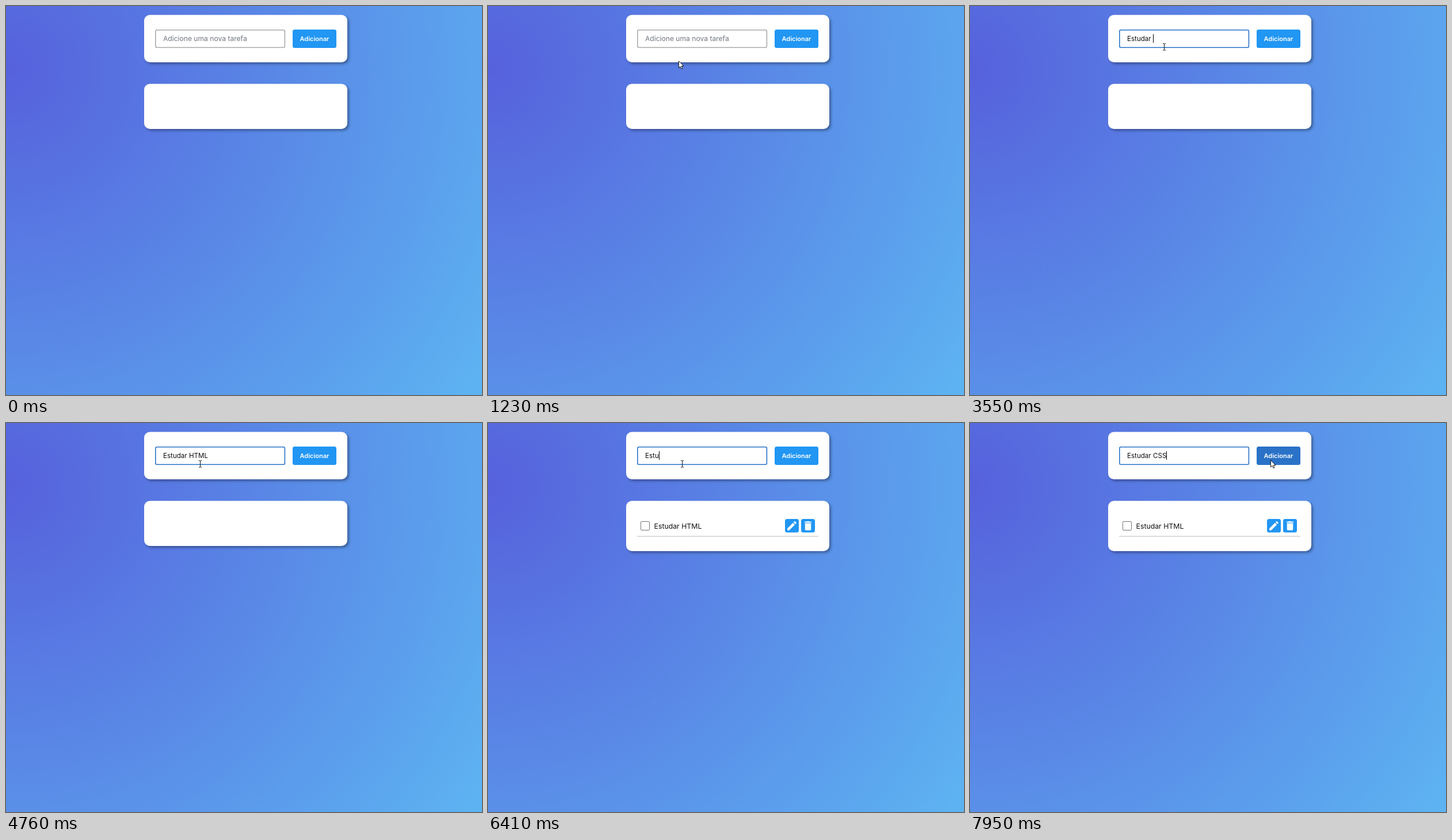
Recreate the animation shown at these times as an HTML page. Size 827 by 677 pixels, loop 8 s.

```html
<!DOCTYPE html>
<html lang="pt">
<head>
<meta charset="utf-8">
<title>Lista de tarefas</title>
<style>
  html, body { margin: 0; width: 100%; height: 100%; overflow: hidden; }
  body { background: radial-gradient(circle farthest-corner at 0 16%, #5661dc, #5db4f2); }
  svg { display: block; width: 827px; height: 677px; }
  text { font-family: Inter, "Open Sans", sans-serif; white-space: pre; }
  .card { fill: #fff; filter: drop-shadow(3px 3px 2px rgba(0, 0, 0, .33)); }
  .blue { fill: #2196f3; }
  .icon { fill: #fff; }
</style>
</head>
<body>
<svg viewBox="0 0 827 677">
  <rect class="card" x="240" y="15.5" width="353" height="82.5" rx="10"/>
  <rect id="field" x="259.8" y="41.8" width="224.6" height="30.4" rx="2.5" fill="#fff" stroke-width="1.6"/>
  <text id="hint" x="273" y="60.5" font-size="12.1" fill="#707580">Adicione uma nova tarefa</text>
  <text id="typed" x="273" y="60.5" font-size="11.6" fill="#111"></text>
  <rect id="caret" y="49" width="1" height="15"/>
  <rect id="button" x="498" y="41" width="76" height="32" rx="3.5"/>
  <text x="536" y="60.5" font-size="11" font-weight="600" fill="#fff" text-anchor="middle">Adicionar</text>

  <rect id="list" class="card" x="240" y="135.5" width="353" rx="10"/>
  <g id="task">
    <rect x="265.5" y="171.5" width="15" height="15" rx="1.5" fill="#fff" stroke="#767676"/>
    <text x="288.5" y="183.5" font-size="12.3" fill="#111">Estudar HTML</text>
    <rect x="259" y="196.5" width="315" height="1.5" fill="#d0d0d0"/>
    <rect class="blue" x="516" y="167" width="24" height="23.5" rx="3.5"/>
    <rect class="blue" x="544" y="167" width="24" height="23.5" rx="3.5"/>
    <path class="icon" transform="translate(517.5 168.3) scale(.875)" d="M3 17.25V21h3.75L17.81 9.94l-3.75-3.75zM20.71 7.04a1 1 0 0 0 0-1.41l-2.34-2.34a1 1 0 0 0-1.41 0l-1.83 1.83 3.75 3.75z"/>
    <path class="icon" transform="translate(545.5 168.3) scale(.875)" d="M6 19c0 1.1.9 2 2 2h8c1.1 0 2-.9 2-2V7H6zM19 4h-3.5l-1-1h-5l-1 1H5v2h14z"/>
  </g>

  <path id="arrow" d="M.4 .8V12.9L3.2 10.3 5 14.5 7 13.7 5.2 9.5H9Z" fill="#fff" stroke="#000" stroke-width=".9"/>
  <path id="beam" d="M-2.5 -5.5H-.7L0 -5 .7 -5.5H2.5M0 -5V5.5M-2.5 6H-.7L0 5.5 .7 6H2.5" fill="none" stroke="#111"/>
</svg>
<script>
const LOOP = 8000, STEP = 70, FOCUS = 1970, SUBMIT = 5140;
const $ = id => document.getElementById(id);
const show = (id, on) => $(id).style.display = on ? '' : 'none';
const between = (t, a, b) => t >= a && t < b;

// Each entry of times is the moment the matching character appears.
const entries = [
  { text: 'Estudar HTML', end: SUBMIT,
    times: [2570, 2830, 2960, 3160, 3260, 3360, 3450, 3550, 3750, 3880, 4080, 4280] },
  { text: 'Estudar CSS', end: LOOP,
    times: [5750, 6130, 6280, 6410, 6540, 6620, 6700, 6790, 7140, 7270, 7400] }
];

function typedAt(t) {
  const entry = entries.find(e => t < e.end);
  return entry.text.slice(0, entry.times.filter(time => time <= t).length);
}

// The pointer advances in discrete steps and slows down towards its goal.
const progress = (t, start, count) =>
  Math.min(1, Math.floor((t - start) / STEP + 1) / count);
const ease = (from, to, p, power = 2) => to + (from - to) * (1 - p) ** power;

function pointerAt(t) {
  if (t < 880) {
    const p = Math.min(1, Math.floor((t - 330) / STEP) / 5);
    return [ease(733, 299, p, 1.6), ease(646, 224, p, 1.9)];
  }
  if (t < 7670) {
    const p = progress(t, 880, 10);
    return [ease(299, 337, p), ease(224, 71, p)];
  }
  const p = progress(t, 7670, 5);
  return [ease(337, 522, p), ease(71, 64, p)];
}

function draw(t) {
  const text = typedAt(t);
  $('typed').textContent = text;
  show('hint', !text);
  $('field').setAttribute('stroke', t < FOCUS ? '#aaa' : t < FOCUS + STEP ? '#6a8fb9' : '#2a73c8');

  show('caret', between(t, FOCUS, 2500) || between(t, 2570, 4760) || t >= 5290);
  const width = text ? $('typed').getComputedTextLength() : 0;
  $('caret').setAttribute('x', Math.round(273 + width));

  const submitted = t >= SUBMIT;
  show('task', submitted);
  $('list').setAttribute('height', submitted ? 87.5 : 78.5);

  const [x, y] = pointerAt(t);
  const overField = between(x, 259, 485) && between(y, 41, 73);
  const overButton = between(x, 498, 574) && between(y, 41, 73);
  $('button').setAttribute('fill', overButton ? '#2a72c8' : '#2196f3');
  show('arrow', t >= 330 && !overField);
  show('beam', t >= 330 && overField);
  const place = `translate(${Math.round(x)} ${Math.round(y)})`;
  $('arrow').setAttribute('transform', place);
  $('beam').setAttribute('transform', `${place} translate(.5 0)`);
}

const start = performance.now();
function tick() {
  draw((performance.now() - start) % LOOP);
  requestAnimationFrame(tick);
}
tick();
</script>
</body>
</html>
```
